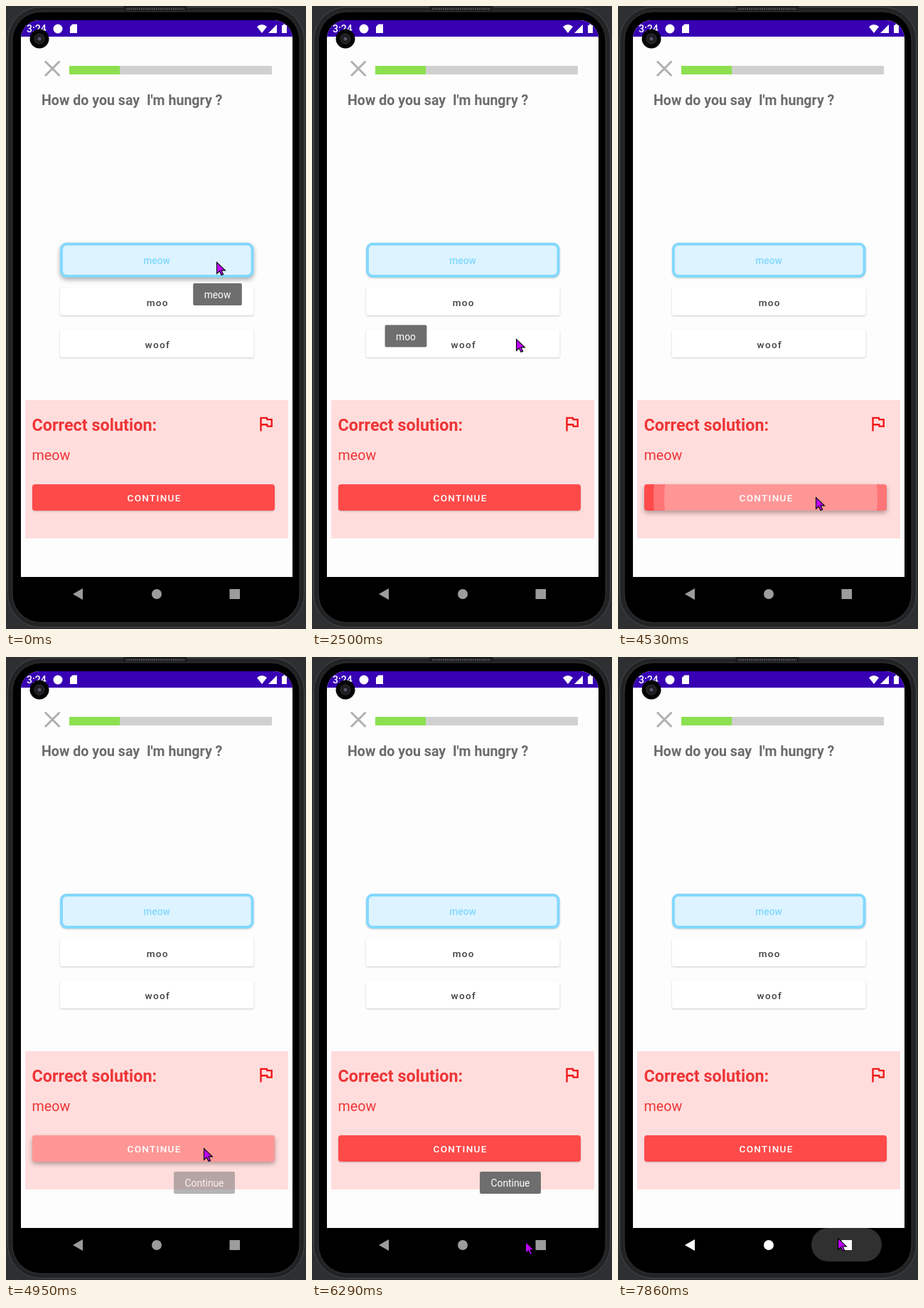
These frames come from a looping animation (422x874 px, 8000 ms). An HTML page:

```html
<!DOCTYPE html>
<html lang="en">
<head>
<meta charset="utf-8">
<title>Quiz on a phone</title>
<style>
html, body { margin: 0; width: 100%; height: 100%; overflow: hidden; background: #2e2f31; }
svg { display: block; width: 422px; height: 874px; font-family: Roboto, sans-serif; }
text { white-space: pre; }
.bold { font-weight: 700; }
.label { font-size: 13.6px; font-weight: 500; letter-spacing: 1.25px; text-anchor: middle; fill: #404040; }
.tip text { font-size: 13.8px; fill: #fff; text-anchor: middle; }
.tip rect { fill: #6e6e6e; }
.low { filter: drop-shadow(0 1px 1px rgba(0,0,0,.2)); }
.high { filter: drop-shadow(0 3px 3px rgba(0,0,0,.32)); }
</style>
</head>
<body>
<svg viewBox="0 0 422 874">
  <defs>
    <clipPath id="screen"><path d="M21 801V46A26 26 0 0 1 47 20H377A26 26 0 0 1 403 46V801Z"/></clipPath>
    <clipPath id="face"><rect x="37" y="671" width="341" height="37" rx="4"/></clipPath>
  </defs>

  <!-- phone body -->
  <rect width="422" height="874" fill="#2e2f31"/>
  <rect x="2.5" y="1.5" width="417" height="870" rx="46" fill="#222324" stroke="#47484a"/>
  <rect x="9" y="8" width="404" height="857" rx="40" fill="#000" stroke="#343537"/>
  <rect x="165" y="0" width="90" height="7" rx="3" fill="#1b1b1c"/>
  <path d="M169 4H251" stroke="#48494b" stroke-width="3" stroke-dasharray="2 1"/>

  <g clip-path="url(#screen)">
    <rect x="21" y="20" width="382" height="781" fill="#fdfdfd"/>
    <rect x="21" y="20" width="382" height="23" fill="#3700b3"/>
    <g fill="#fff">
      <text x="29" y="37" font-size="14" font-weight="500">3:24</text>
      <circle cx="73" cy="32" r="6.5"/>
      <path d="M93.5 25.5H100V38H90V29Z"/>
      <path d="M353 29Q360 23 367 29L360 38Z"/>
      <path d="M369 38L381 26V38Z"/>
      <path d="M388 27H390V25.5H393V27H395V38H388Z"/>
    </g>
  </g>
  <circle cx="47" cy="46" r="13.5" fill="#050505"/>
  <circle cx="47" cy="46" r="7" fill="#1d1d20" stroke="#35353a"/>
  <circle cx="47" cy="46" r="2.5" fill="#50556a"/>

  <!-- question -->
  <path d="M55 77.5L75.5 98M75.5 77.5L55 98" stroke="#afafaf" stroke-width="3"/>
  <rect x="89" y="84" width="285" height="12" fill="#d0d0d0"/>
  <rect x="89" y="84" width="71" height="12" fill="#8ce04f"/>
  <text class="bold" x="50" y="138.5" font-size="19.6" fill="#6b6b6b">How do you say  I'm hungry ?</text>

  <!-- answers -->
  <rect id="meow" x="78" y="334" width="268.5" height="45" rx="7" fill="#ddf3ff" stroke="#84d8ff" stroke-width="4"/>
  <text x="212" y="362" font-size="13.8" font-weight="500" text-anchor="middle" fill="#84d8ff">meow</text>
  <rect id="moo" x="76" y="395" width="272.5" height="39" rx="3" fill="#fff"/>
  <text class="label" x="213.3" y="420.5">moo</text>
  <rect id="woof" x="76" y="454" width="272.5" height="39" rx="3" fill="#fff"/>
  <text class="label" x="213.3" y="479.5">woof</text>

  <!-- solution panel -->
  <rect x="27" y="553" width="370" height="194" fill="#fdd"/>
  <text class="bold" x="36.5" y="596" font-size="23.4" fill="#ee3536">Correct solution:</text>
  <text x="36.5" y="637" font-size="19.7" fill="#ee3536">meow</text>
  <path transform="translate(351.5 572) scale(1.17)" fill="#f01414"
    d="M12.36 6l.4 2H18v6h-3.36l-.4-2H7V6h5.36M14 4H5v17h2v-7h5.6l.4 2h7V6h-5.6L14 4z"/>
  <rect id="next" x="37" y="671" width="341" height="37" rx="4" fill="#ff4a4a"/>
  <g clip-path="url(#face)" fill="#fff">
    <circle id="hoverWave" cx="278" cy="690"/>
    <circle id="pressWave" cx="215" cy="690"/>
  </g>
  <text class="label" x="208.6" y="695" style="fill:#fff">CONTINUE</text>

  <!-- navigation -->
  <rect id="pill" x="272" y="801" width="99" height="47" rx="23.5" fill="#303030"/>
  <g id="nav">
    <path d="M94 825L108 817V833Z"/>
    <circle cx="212" cy="825" r="7"/>
    <rect x="314.5" y="818" width="14.5" height="14"/>
  </g>

  <g id="tips"></g>
  <path id="cursor" d="M.5 .5V16.5L4.4 13 7 18.6 9.6 17.4 7.1 11.9H12.4Z"
    fill="#c000ff" stroke="#000" stroke-width="1.1"/>
</svg>
<script>
const LOOP = 8000, STEP = 120;
const $ = id => document.getElementById(id);
const set = (id, name, value) => $(id).setAttribute(name, value);

// Climbs from 0 to 1 in n screen updates, the first of them at start.
const ramp = (t, start, n = 1) =>
  Math.min(1, Math.max(0, (Math.floor((t - start) / STEP) + 1) / n));
const smooth = k => k * k * (3 - 2 * k);

// Pointer moves: when, in how many updates, to where
const moves = [
  { at: 0, n: 1, x: 296, y: 359 },
  { at: 320, n: 3, x: 132, y: 407 },
  { at: 2220, n: 3, x: 287, y: 467 },
  { at: 2880, n: 1, x: 290, y: 469 },
  { at: 4000, n: 2, x: 278, y: 689 },
  { at: 5920, n: 4, x: 300, y: 820 },
  { at: 6400, n: 3, x: 254, y: 730 },
  { at: 6800, n: 4, x: 309, y: 815 }
];

function pointer(t) {
  let x = 0, y = 0;
  for (const m of moves) {
    const k = smooth(ramp(t, m.at, m.n));
    x += (m.x - x) * k;
    y += (m.y - y) * k;
  }
  return [x, y];
}

// Tooltips: centre, top, then start and updates of fading in and out
const tips = [
  { text: "meow", x: 297.5, y: 389, show: [-LOOP, 1], hide: [1180, 1] },
  { text: "moo", x: 132, y: 447.5, show: [1470, 3], hide: [2880, 2] },
  { text: "woof", x: 286.3, y: 506, show: [3270, 2], hide: [4530, 1] },
  { text: "Continue", x: 279, y: 722, show: [4950, 2], hide: [7160, 2] }
];

for (const tip of tips) {
  $("tips").insertAdjacentHTML("beforeend",
    `<g class="tip"><rect y="${tip.y}" height="31" rx="2"/>
     <text x="${tip.x}" y="${tip.y + 21}">${tip.text}</text></g>`);
  tip.node = $("tips").lastElementChild;
  const [box, label] = tip.node.children;
  const width = label.getComputedTextLength() + 31;
  box.setAttribute("x", tip.x - width / 2);
  box.setAttribute("width", width);
}

const raised = { meow: [0, 320], moo: [1180, 2370], woof: [2880, 4000], next: [4530, 5770] };

function wave(id, radius, alpha) {
  set(id, "r", radius);
  set(id, "opacity", .24 * alpha);
}

function draw(t) {
  set("cursor", "transform", `translate(${pointer(t)})`);
  for (const { node, show, hide } of tips)
    node.style.opacity = ramp(t, ...show) * (1 - ramp(t, ...hide) ** 3);
  for (const id in raised) {
    const [from, to] = raised[id];
    set(id, "class", t >= from && t < to ? "high" : "low");
  }
  wave("hoverWave", 342 * ramp(t, 4390, 3), 1 - ramp(t, 5770, 2));
  wave("pressWave", 300 * ramp(t, 4530, 2), 1 - ramp(t, 5770));

  const press = ramp(t, 7740, 2);
  const grey = 156 + 99 * press;
  set("pill", "opacity", press);
  set("nav", "fill", `rgb(${grey},${grey},${grey})`);
}

function tick() {
  draw(performance.now() % LOOP);
  requestAnimationFrame(tick);
}
tick();
</script>
</body>
</html>
```
